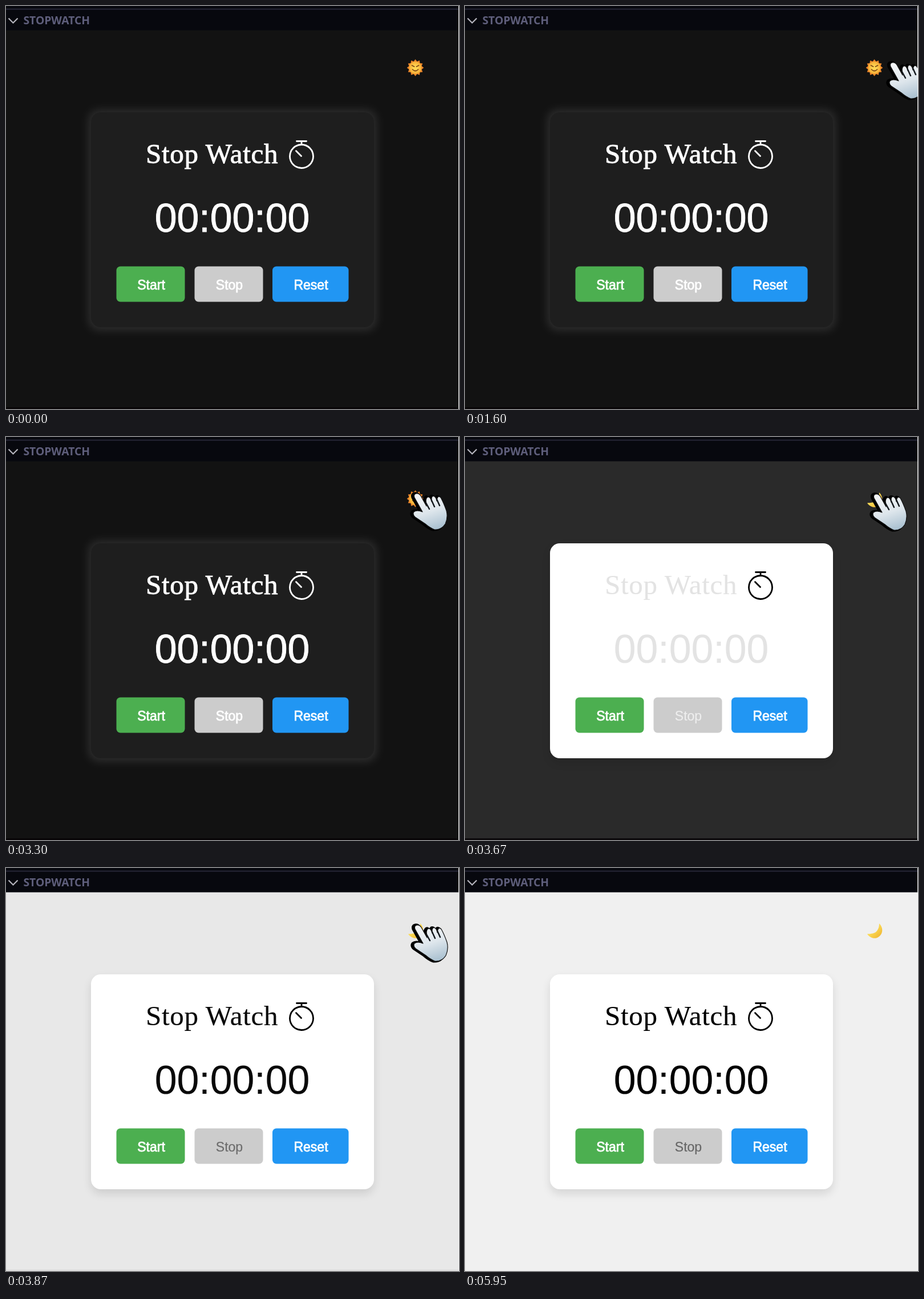
An HTML page for the animation above (9430 ms loop, 794 px wide and 705 px high).

```html
<!DOCTYPE html>
<html lang="en">
<head>
<meta charset="utf-8">
<title>Stopwatch</title>
<style>
  html, body { margin: 0; width: 100%; height: 100%; overflow: hidden; background: #121212; }
  svg { display: block; width: 794px; height: 705px; }
  .sans { font-family: "Liberation Sans", Arial, sans-serif; text-anchor: middle; }
  .label { font-size: 23px; stroke-width: .8px; }
</style>
</head>
<body>
<svg viewBox="0 0 794 705">
  <defs>
    <filter id="soft" x="-10%" y="-10%" width="120%" height="120%"><feGaussianBlur stdDeviation="8"/></filter>
    <linearGradient id="skin" x1=".35" y1="0" x2=".65" y2="1">
      <stop offset="0" stop-color="#f3f5f7"/>
      <stop offset=".5" stop-color="#dee6ec"/>
      <stop offset="1" stop-color="#a9c0d0"/>
    </linearGradient>
    <linearGradient id="moonFill" x1="0" y1="0" x2="1" y2="1">
      <stop offset=".4" stop-color="#fbdc58"/>
      <stop offset="1" stop-color="#eeb02c"/>
    </linearGradient>
    <radialGradient id="sunFill">
      <stop offset=".3" stop-color="#ffd552"/>
      <stop offset="1" stop-color="#f6ad35"/>
    </radialGradient>
  </defs>

  <rect id="page" width="794" height="705"/>
  <rect id="footer" y="702" width="794" height="3" fill="#080507"/>
  <rect width="794" height="42.500" fill="#07080e"/>
  <rect y="4.500" width="794" height="2" fill="#272737"/>
  <path d="M4.500 21.500L12.500 29.500L20.500 21.500" fill="none" stroke="#b4b4bc" stroke-width="2.200"/>
  <text x="30.500" y="32" font-family="Open Sans, Noto Sans, sans-serif" font-size="19.300" font-weight="700" fill="#5e5e7b">STOPWATCH</text>

  <rect id="glow" x="145" y="182" width="504" height="385" rx="18" fill="#fff" opacity=".12" filter="url(#soft)"/>
  <rect id="shadow" x="149" y="193" width="496" height="377" rx="18" fill="#000" filter="url(#soft)"/>
  <rect id="card" x="149" y="186" width="496" height="376" rx="17"/>

  <g id="ink">
    <text x="245" y="275" font-family="Liberation Serif, Times New Roman, serif" font-size="49" letter-spacing=".7">Stop Watch</text>
    <text class="sans" x="396.500" y="395" font-size="69.800">00:00:00</text>
  </g>
  <g id="icon" fill="none" stroke-width="2.800" stroke-linecap="round">
    <circle cx="518" cy="263" r="20.500"/>
    <path d="M509.500 236.500H526.500M518 237V242M508.500 253.500L517.500 262.500"/>
  </g>

  <rect x="193.500" y="455.500" width="120" height="62" rx="7" fill="#4caf50"/>
  <rect x="330.500" y="455.500" width="120" height="62" rx="7" fill="#ccc"/>
  <rect x="467" y="455.500" width="133.500" height="62" rx="7" fill="#2196f3"/>
  <g class="sans label" fill="#fff" stroke="#fff">
    <text x="254.500" y="496">Start</text>
    <text id="stop" x="391.500" y="496">Stop</text>
    <text x="534.500" y="496">Reset</text>
  </g>

  <g id="sun" transform="translate(717.500 108)">
    <path id="rays" fill="#e8842a"/>
    <circle r="10.800" fill="url(#sunFill)"/>
    <path d="M-6 -4L-2 -2M6 -4L2 -2M-5 3Q0 8 5 3" fill="none" stroke="#7b4615" stroke-width="1.700" stroke-linecap="round"/>
  </g>
  <path id="moon" d="M726 97C735 106 732 119 721 122.500C714 124 708 120 705 115.500C712 115 718 115 722 110C725 106 726 102 726 97Z" fill="url(#moonFill)"/>

  <g id="hand" stroke-linejoin="round" stroke-linecap="round">
    <path id="edge" fill="#000" stroke="#000" stroke-width="5" transform="translate(-3 0)"/>
    <path id="palm" fill="url(#skin)" stroke="#111" stroke-width="1.200"/>
    <path d="M737 116L743 127M747 112L752 123M756.500 111L761 121" fill="none" stroke="#10151a" stroke-width="2.400"/>
  </g>
  <rect x="793" width="1" height="705" fill="#fff"/>
</svg>
<script>
const LOOP = 9430, CLICK = 3670, HIDE = 4790;
const FADE = [[CLICK, .11], [3790, .86], [3870, .964], [3990, 1]];
const PATH = [[1400, 78], [1520, 46], [1600, 30], [2000, 17], [2400, 0]];

const $ = id => document.getElementById(id);
const set = (id, attrs) => {
  for (const key in attrs) $(id).setAttribute(key, attrs[key]);
};
const mix = (a, b, p) => a + (b - a) * p;
const gray = (a, b, p) => {
  const v = Math.round(mix(a, b, p));
  return `rgb(${v},${v},${v})`;
};

const palm = "M717 107Q715 101 720 100Q725 99 728 104L738 122L737 112Q738 105 742 106" +
  "Q745 107 747 114L747 108Q748 103 752 105Q755 107 756 113L757 108Q759 103 763 107" +
  "Q768 116 773 130Q776 142 771 153Q764 164 752 163Q744 160 736 153L718 141" +
  "Q713 136 716 132Q721 128 731 132Z";
set("palm", { d: palm });
set("edge", { d: palm });

const rays = Array.from({ length: 24 }, (_, i) => {
  const a = i * Math.PI / 12, r = i % 2 ? 11.5 : 14.8;
  return [r * Math.cos(a), r * Math.sin(a)].map(v => v.toFixed(1));
});
set("rays", { d: "M" + rays.join("L") + "Z" });

function snap(t) {
  const r = t % 200;
  return t - (r < 120 ? r : r - 120);
}

function handX(t) {
  const s = snap(t);
  const i = PATH.findIndex(([time]) => time > s);
  if (i < 0) return 0;
  if (i === 0) return PATH[0][1];
  const [t0, x0] = PATH[i - 1], [t1, x1] = PATH[i];
  return mix(x0, x1, (s - t0) / (t1 - t0));
}

function draw(t) {
  const light = t >= CLICK;
  const p = FADE.reduce((v, [time, value]) => t >= time ? value : v, 0);
  const show = (id, on) => set(id, { visibility: on ? "visible" : "hidden" });

  set("page", { fill: gray(18, 240, p) });
  set("footer", { opacity: 1 - p });
  set("card", { fill: light ? "#fff" : "#1e1e1e" });
  set("shadow", { opacity: light ? .11 : 0 });
  const ink = gray(255, 0, p);
  set("ink", { fill: ink, stroke: ink, "stroke-width": light ? .2 : .9 });
  set("icon", { stroke: light ? "#000" : "#fff" });
  const label = gray(255, 102, p);
  set("stop", { fill: label, stroke: label, style: `stroke-width: ${light ? 0.2 : 0.8}px` });
  show("glow", !light);
  show("sun", !light);
  show("moon", light);
  show("hand", t >= 1400 && t < HIDE);
  const nudge = light ? 0 : -1;
  set("hand", { transform: `translate(${handX(t) + nudge} ${nudge})` });
}

function tick() {
  draw(performance.now() % LOOP);
  requestAnimationFrame(tick);
}
tick();
</script>
</body>
</html>
```
